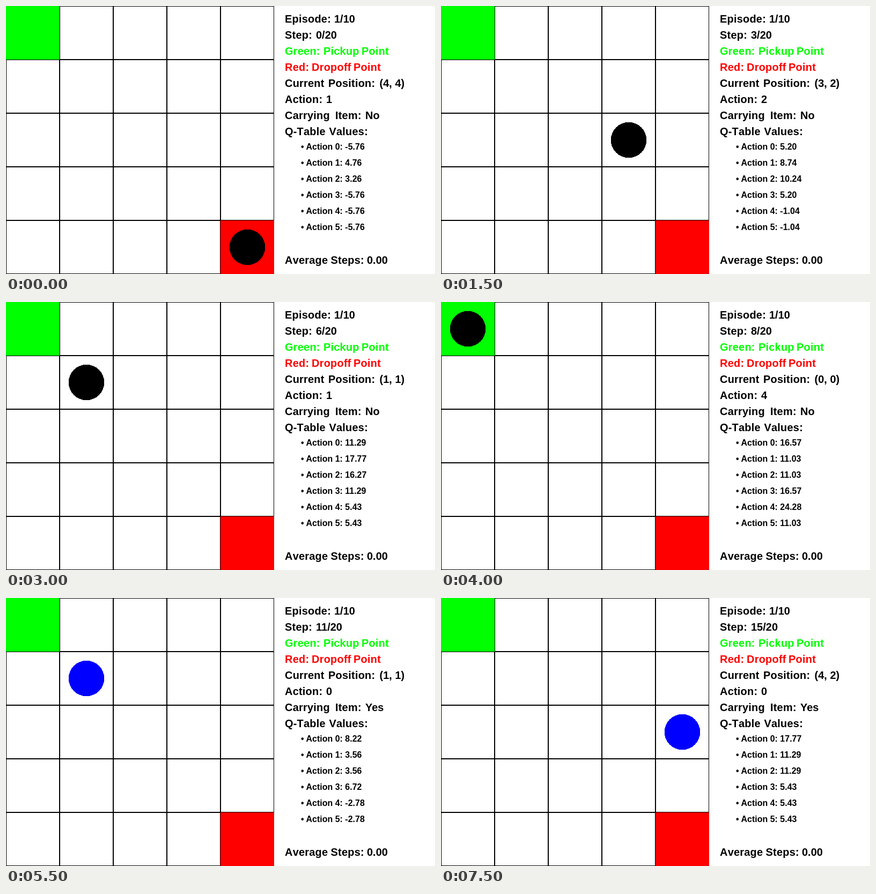
Animation, 800 px wide and 500 px high, one loop 8 s. Source, as an HTML page:

```html
<!DOCTYPE html>
<html lang="en">
<head>
<meta charset="utf-8">
<title>Grid pickup agent</title>
<style>
  html, body { margin: 0; width: 100%; height: 100%; overflow: hidden; background: #fff; }
  svg { display: block; }
  text { font: bold 20px "Liberation Sans", Arial, sans-serif; white-space: pre; }
  .label { letter-spacing: .2px; font-kerning: none; }
  .q { font-size: 16px; }
  rect, circle { shape-rendering: crispEdges; }
</style>
</head>
<body>
<svg id="stage" width="800" height="500" viewBox="0 0 800 500"></svg>
<script>
const STEP_MS = 500, CELL = 100, GRID = 5;
const ACTION_KEYS = 'DULRPO'; // down, up, left, right, pick up, drop off
const MOVES = { D: [0, 1], U: [0, -1], L: [-1, 0], R: [1, 0] };
const ROUTE = 'ULULLUULPRDDRRRD';
const PICKUP_STEP = ROUTE.indexOf('P');

const stage = document.getElementById('stage');

function add(tag, attrs, content = '') {
  const el = document.createElementNS('http://www.w3.org/2000/svg', tag);
  for (const name in attrs) el.setAttribute(name, attrs[name]);
  el.textContent = content;
  return stage.appendChild(el);
}

const square = (x, y, size, fill) => add('rect', { x, y, width: size, height: size, fill });
const label = (x, y, content, fill = '#000') => add('text', { x, y, fill, class: 'label' }, content);
const value = (x, y, content) => add('text', { x, y }, content);
const lineY = row => 31 + 30 * row;

// Discount 0.9, reward -1 per move and 20 at each goal, repeating every 9 steps
function bestValue(step) {
  const cycle = PICKUP_STEP + 1;
  const left = PICKUP_STEP - step % cycle;
  return 21 / (1 - 0.9 ** cycle) * 0.9 ** left - 10;
}

// Other actions trail their ideal values, as in a partly trained table
function qValue(key, step, [x, y], carrying) {
  const best = bestValue(step);
  if (key === ROUTE[step]) return best;
  const move = MOVES[key];
  const inside = n => n >= 0 && n < GRID;
  if (!move || !inside(x + move[0]) || !inside(y + move[1])) return 0.86 * best - 9.85;
  const towardGoal = (move[0] + move[1] > 0) === carrying;
  return towardGoal ? best - 1.5 : 0.81 * best - 3.1;
}

function buildStates() {
  let pos = [4, 4];
  return [...ROUTE].map((key, step) => {
    const carrying = step > PICKUP_STEP;
    const q = [...ACTION_KEYS].map(k => qValue(k, step, pos, carrying));
    const state = { pos, carrying, q, action: ACTION_KEYS.indexOf(key) };
    const [dx, dy] = MOVES[key] || [0, 0];
    pos = [pos[0] + dx, pos[1] + dy];
    return state;
  });
}

const states = buildStates();

for (let x = 0; x < GRID; x++) {
  for (let y = 0; y < GRID; y++) {
    square(x * CELL, y * CELL, CELL, '#000');
    square(x * CELL + 1, y * CELL + 1, CELL - 2, '#fff');
  }
}
square(0, 0, CELL, '#0f0');
square(400, 400, CELL, '#f00');
const agent = add('circle', { r: 33.3 });

['Episode:', 'Step:', 'Green:', 'Red:', 'Current', 'Action:', 'Carrying', 'Q-Table'].forEach((word, row) =>
  label(520, lineY(row), word, { 'Green:': '#0f0', 'Red:': '#f00' }[word]));
label(592, lineY(2), 'Pickup', '#0f0');
label(663, lineY(2), 'Point', '#0f0');
label(570, lineY(3), 'Dropoff', '#f00');
label(648, lineY(3), 'Point', '#f00');
label(601, lineY(4), 'Position:');
label(614, lineY(6), 'Item:');
label(602.5, lineY(7), 'Values:');
label(520, lineY(15), 'Average');
label(605.5, lineY(15), 'Steps:');
value(612, lineY(0), '1/10');
value(673, lineY(15), '0.00');

const stepText = value(578, lineY(1));
const posText = value(696.5, lineY(4));
const actionText = value(597, lineY(5));
const carryText = value(670, lineY(6));
const qTexts = [...ACTION_KEYS].map((_, i) => add('text', { x: 550, y: 268 + 30 * i, class: 'q' }));

function render(time) {
  const step = Math.floor(time / STEP_MS) % states.length;
  const { pos, action, carrying, q } = states[step];
  agent.setAttribute('cx', pos[0] * CELL + CELL / 2);
  agent.setAttribute('cy', pos[1] * CELL + CELL / 2);
  agent.setAttribute('fill', carrying ? '#00f' : '#000');
  stepText.textContent = `${step}/20`;
  posText.textContent = `(${pos.join(', ')})`;
  actionText.textContent = action;
  carryText.textContent = carrying ? 'Yes' : 'No';
  qTexts.forEach((el, i) => { el.textContent = `• Action ${i}: ${q[i].toFixed(2)}`; });
}

const start = performance.now();
function tick() {
  render(performance.now() - start);
  requestAnimationFrame(tick);
}
tick();
</script>
</body>
</html>
```
